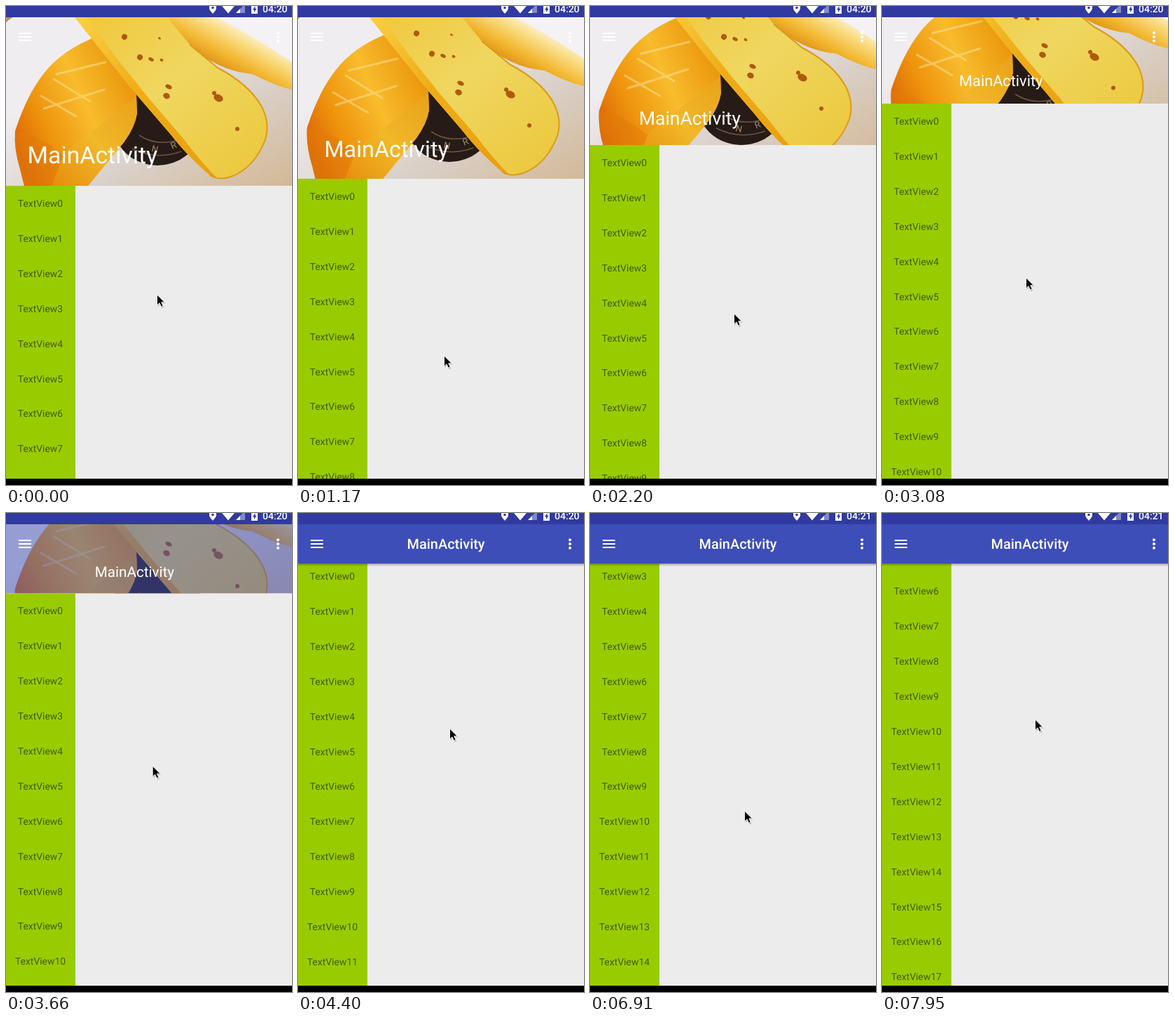
Recreate the animation shown at these times as an HTML page. Size 408 px wide and 682 px high, loop 8000 ms.

```html
<!DOCTYPE html>
<html lang="en">
<head>
<meta charset="utf-8">
<title>Collapsing toolbar</title>
<style>
  html, body { margin: 0; width: 100%; height: 100%; overflow: hidden; background: #ececec; }
  svg { display: block; width: 100vw; height: 100vh; font-family: Roboto, sans-serif; text-rendering: geometricPrecision; }
  #rows { font-size: 13.9px; fill: #000; fill-opacity: .56; text-anchor: middle; }
</style>
</head>
<body>
<svg viewBox="0 0 408 682">
  <defs>
    <clipPath id="headerClip"><rect id="headerBox" y="16" width="408" height="240"/></clipPath>
    <linearGradient id="plate" x1="0" y1="0" x2="1" y2="1">
      <stop offset=".3" stop-color="#efedf0"/><stop offset=".65" stop-color="#dad1ca"/><stop offset="1" stop-color="#d3b896"/>
    </linearGradient>
    <linearGradient id="wheel" x1="0" y1=".7" x2=".9" y2=".2">
      <stop offset="0" stop-color="#dc6806"/><stop offset=".25" stop-color="#ee930c"/><stop offset=".6" stop-color="#f8bc2c"/><stop offset="1" stop-color="#ea960c"/>
    </linearGradient>
    <linearGradient id="cut" x1="0" y1="1" x2="1" y2="0">
      <stop offset="0" stop-color="#e68c0a"/><stop offset=".5" stop-color="#f1b829"/><stop offset="1" stop-color="#e8a21a"/>
    </linearGradient>
    <linearGradient id="slab" x1="0" y1="0" x2="1" y2="1">
      <stop offset="0" stop-color="#f1c63a"/><stop offset=".45" stop-color="#efd760"/><stop offset="1" stop-color="#ecc63a"/>
    </linearGradient>
    <linearGradient id="rind" x1="0" y1="0" x2="1" y2="1">
      <stop offset="0" stop-color="#fad046"/><stop offset=".45" stop-color="#f0ad18"/><stop offset="1" stop-color="#e99e0e"/>
    </linearGradient>
    <linearGradient id="wedge" gradientUnits="userSpaceOnUse" x1="335" y1="28" x2="300" y2="92">
      <stop offset="0" stop-color="#fdf4dc"/><stop offset=".3" stop-color="#f9da7c"/><stop offset=".65" stop-color="#f2b52e"/><stop offset="1" stop-color="#d98812"/>
    </linearGradient>
    <linearGradient id="fall" x1="0" y1="0" x2="0" y2="1">
      <stop offset="0" stop-color="#000" stop-opacity=".3"/><stop offset="1" stop-color="#000" stop-opacity="0"/>
    </linearGradient>
  </defs>

  <rect width="408" height="682" fill="#ececec"/>
  <rect id="column" width="99" height="673" fill="#9c0"/>
  <g id="rows"></g>
  <rect id="shadow" y="72" width="408" height="4" fill="url(#fall)"/>

  <g clip-path="url(#headerClip)">
    <g id="photo">
      <rect y="16" width="408" height="240" fill="url(#plate)"/>
      <path d="M0 16H10Q4 19 0 24Z" fill="#b98e70"/>
      <path d="M290 16H408V90Z" fill="#f4f2f4"/>
      <path d="M228 16H300Q352 42 408 80V119Q385 114 352 97Q300 92 262 55Z" fill="url(#wedge)"/>
      <ellipse cx="216" cy="166" rx="64" ry="61" fill="#261b17"/>
      <path d="M190 184Q216 201 248 190M180 203Q214 220 250 207" fill="none" stroke="#6b5540" stroke-width="1.5"/>
      <g fill="#a28b63" font-size="13"><text x="207" y="207" transform="rotate(12 207 207)">N</text><text x="237" y="204" transform="rotate(-22 237 204)">R</text></g>
      <path d="M13 178Q30 126 54 96Q80 62 133 42L150 78L186 126L187 153Q184 172 169 193L117 256H26L20 232Q11 203 13 178Z" fill="url(#wheel)"/>
      <path d="M186 129L187 153Q184 172 169 193L117 256H65L82 213Q98 194 123 179Z" fill="url(#cut)"/>
      <path d="M13 180Q40 178 82 213L65 256H26L20 232Q11 203 13 180Z" fill="#e17c0a" opacity=".5"/>
      <path d="M54 146L140 119M50 128L100 157M68 104L120 136M72 97L142 80" fill="none" stroke="#fbe39a" stroke-width="3" stroke-linecap="round" opacity=".5"/>
      <path d="M98 16H230L262 55L302 88Q346 111 364 142Q377 166 370 190Q354 231 321 243Q304 249 291 241Q261 216 235 183L186 126L145 75Z" fill="url(#slab)"/>
      <path d="M98 16H116L160 77L205 133L254 190Q278 222 301 245Q294 245 291 241Q261 216 235 183L186 126L145 75Z" fill="url(#rind)"/>
      <path d="M262 55L302 88Q346 111 364 142Q377 166 370 190Q354 231 321 243Q304 249 291 241" fill="none" stroke="#dc9a16" stroke-width="2"/>
      <g id="holes" fill="#b0590c"></g>
    </g>
    <rect id="scrim" y="16" width="408" height="240" fill="#3e4eb8"/>
  </g>

  <g fill="#fff">
    <path d="M18 38h18v2h-18zM18 43h18v2h-18zM18 48h18v2h-18z"/>
    <circle cx="388" cy="38.3" r="2"/><circle cx="388" cy="44" r="2"/><circle cx="388" cy="49.7" r="2"/>
    <text id="title"></text>
  </g>

  <rect width="408" height="16" fill="#303aa0"/>
  <g fill="#fff">
    <path d="M290 0H300V4Q299 7 295 11Q291 7 290 4Z"/>
    <circle cx="295" cy="2.5" r="1.8" fill="#303aa0"/>
    <path d="M308 0H326L317 10.5Z"/>
    <path d="M341 0V10H328L338 0Z" opacity=".4"/><path d="M334 4V10H328Z"/>
    <path d="M350 0H359V11H350Z"/>
    <path d="M355.5 0L352 5.5H354V9L357.5 3.8H355.5Z" fill="#303aa0"/>
    <text id="clock" x="366" y="9" font-size="14" font-weight="500"></text>
  </g>
  <rect y="673" width="408" height="9" fill="#000"/>

  <g id="cursor">
    <path d="M.5 2V17L4 13.8L6.4 19.3L9.4 18L7 12.6H11.7Z" fill="#000" opacity=".2"/>
    <path d="M-.5 0V15L3 11.8L5.4 17.2L8.1 16L5.7 10.8H10.3Z" fill="#000" stroke="#fff" stroke-width=".9"/>
  </g>
</svg>
<script>
const LOOP = 8000, STEP = 147, TRAVEL = 184;
const ROW_GAP = 49.9, ROW_COUNT = 22;

// [step, value...]
const scrollKeys = [[6, 0], [7, 3], [8, 10], [15, 58], [21, 117], [30, 191], [39, 291], [44, 291], [45, 304], [54, 469]];
const cursorKeys = [
  [0, 216, 411], [3, 210, 512], [5, 210, 512], [8, 209, 498], [15, 206, 438], [21, 206, 387],
  [30, 217, 307], [39, 233, 208], [40, 233, 208], [44, 222, 480], [54, 219, 294]
];
const holeSpots = [
  [169, 44, 4, 4], [191, 73, 4, 4], [207, 76, 4, 2.5], [222, 77, 2.5, 2], [232, 115, 5, 3],
  [229, 128, 5, 4], [303, 131, 7, 5], [297, 124, 3, 3], [330, 175, 3, 3], [219, 46, 2, 1.5]
];

const el = id => document.getElementById(id);
const set = (node, attrs) => { for (const k in attrs) node.setAttribute(k, attrs[k]); };
const clamp = x => Math.max(0, Math.min(1, x));
const mix = (a, b, p) => a + (b - a) * p;

function add(parent, tag, attrs) {
  const node = document.createElementNS("http://www.w3.org/2000/svg", tag);
  set(node, attrs);
  return parent.appendChild(node);
}

function sample(keys, at) {
  if (at <= keys[0][0]) return keys[0].slice(1);
  const i = keys.findIndex(k => k[0] >= at);
  if (i < 0) return keys[keys.length - 1].slice(1);
  const a = keys[i - 1], b = keys[i], p = (at - a[0]) / (b[0] - a[0]);
  return a.slice(1).map((v, j) => mix(v, b[j + 1], p));
}

for (const [cx, cy, rx, ry] of holeSpots) {
  add(el("holes"), "ellipse", { cx, cy, rx, ry, transform: `rotate(25 ${cx} ${cy})` });
}
for (let i = 0; i < ROW_COUNT; i++) {
  add(el("rows"), "text", { x: 49, y: 286 + i * ROW_GAP }).textContent = "TextView" + i;
}
el("title").textContent = "MainActivity";

function render(time) {
  const step = Math.floor((time + 10) / STEP);
  const [scroll] = sample(scrollKeys, step);
  const shift = Math.min(scroll, TRAVEL), p = shift / TRAVEL, bottom = 256 - shift;
  const collapsed = p === 1;

  set(el("headerBox"), { height: bottom - 16 });
  set(el("photo"), { transform: `translate(0 ${-shift / 2})` });
  set(el("column"), { y: bottom, height: 673 - bottom });
  set(el("rows"), { transform: `translate(0 ${-scroll})` });
  set(el("shadow"), { opacity: collapsed ? 1 : 0 });
  set(el("scrim"), { opacity: clamp((step - 22) / 4) });
  set(el("title"), {
    x: mix(30.6, 155.6, p),
    y: mix(224, 51, p),
    "font-size": mix(33.8, 19.9, 1 - (1 - p) ** 2),
    "font-weight": collapsed ? 500 : 400
  });
  set(el("cursor"), { transform: `translate(${sample(cursorKeys, step).join(" ")})` });
  el("clock").textContent = step < 34 ? "04:20" : "04:21";
}

function tick() {
  render(performance.now() % LOOP);
  requestAnimationFrame(tick);
}
tick();
</script>
</body>
</html>
```
